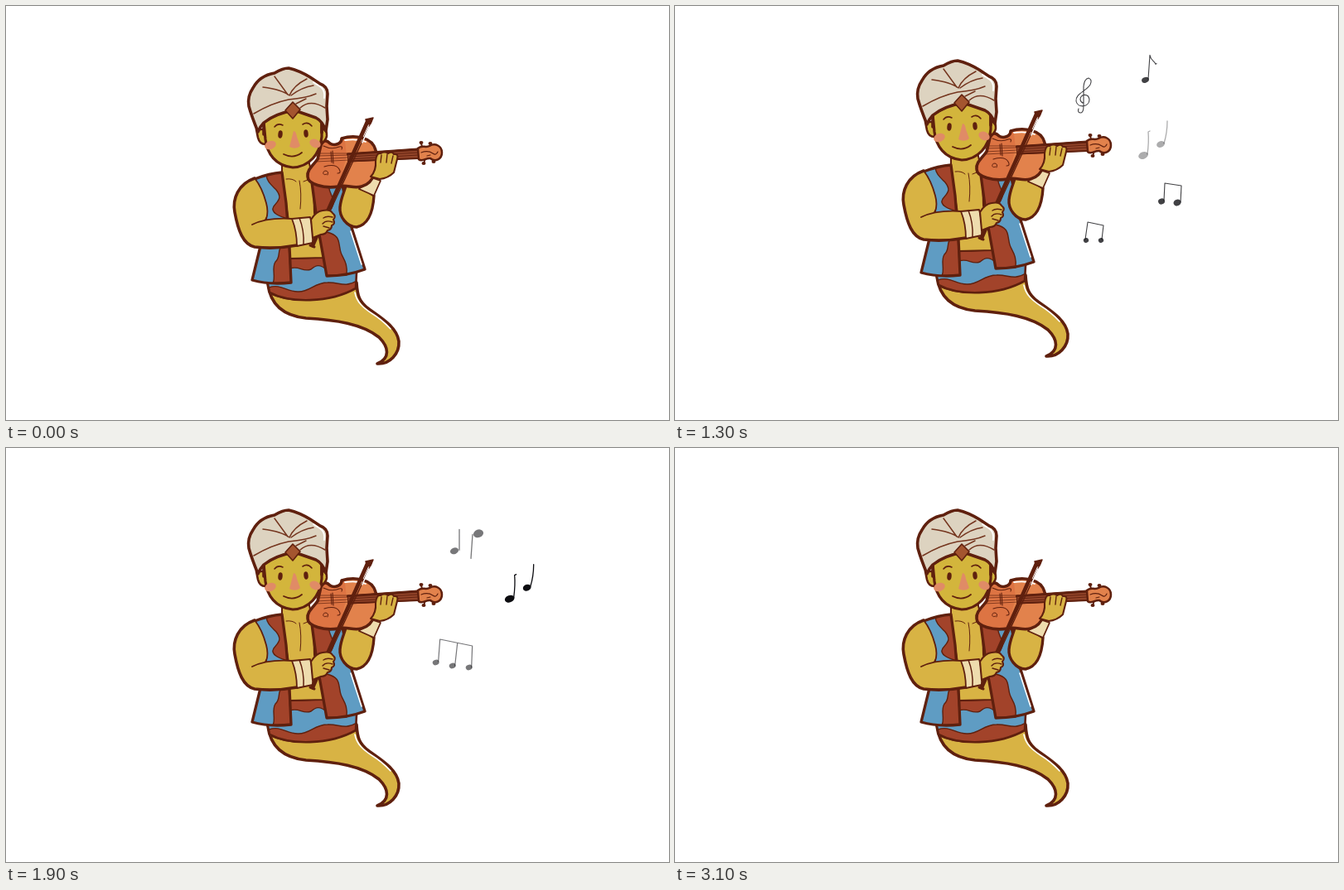
An HTML page with a canvas that plays this animation: 800 by 500 pixels, repeating every 3300 ms.

```html
<!DOCTYPE html>
<html lang="en">
<head>
<meta charset="utf-8">
<title>Genie playing the violin</title>
<style>
html, body { margin: 0; width: 100%; height: 100%; overflow: hidden; background: #fff; }
canvas { display: block; width: 800px; height: 500px; }
</style>
</head>
<body>
<canvas id="stage" width="800" height="500"></canvas>
<script>
const ctx = document.getElementById('stage').getContext('2d');
const LOOP = 3300;
const C = {
  ink: '#5f200e', skin: '#d8b344', face: '#d3b53c', blue: '#5f9cc3', red: '#a2432a',
  cloth: '#ddd3c0', fold: '#75361f', band: '#eedcae', wood: '#e2824c', woodDark: '#dd7443',
  neck: '#93452a', blush: '#e08b66', note: '#0c0c10'
};
ctx.lineCap = ctx.lineJoin = 'round';

function shape(d, fill, width = 0, ink = C.ink) {
  const path = new Path2D(d);
  if (fill) { ctx.fillStyle = fill; ctx.fill(path); }
  if (width) { ctx.strokeStyle = ink; ctx.lineWidth = width; ctx.stroke(path); }
}
const line = (d, width, ink) => shape(d, null, width, ink);

function oval(x, y, rx, ry, tilt, fill) {
  ctx.beginPath();
  ctx.ellipse(x, y, rx, ry, tilt, 0, Math.PI * 2);
  ctx.fillStyle = fill;
  ctx.fill();
}

function drawTail() {
  shape('M316 336 C319 360 334 374 362 377 C398 379 430 384 450 400 C462 412 464 425 448 432 ' +
    'C463 433 475 420 474 405 C472 388 452 376 438 366 C426 357 424 350 423 334 Z', C.skin, 3.6);
  line('M421 346 C423 358 432 365 441 371 Q454 379 464 390', 1.6, '#fff');
}

function drawSash() {
  const sash = 'M315 331 L318 346 C342 359 390 359 422 341 L423 322 L385 303 L342 305 Z';
  shape(sash, C.blue);
  shape('M342 305 L383 304 L388 319 C378 311 374 313 368 318 C358 322 354 313 343 317 Z', C.red, 1.4);
  shape('M317 340 C332 335 338 345 352 345 C366 346 372 334 388 334 C402 333 408 341 423 332 ' +
    'L422 341 C390 359 342 359 318 347 Z', C.red, 1.4);
  line(sash, 2.6);
}

function drawTorso() {
  shape('M333 186 L333 202 L337 235 L342 305 L384 304 L372 250 L371 212 L365 186 Z', C.skin, 2);
  line('M354 211 Q357 226 355 245 M338 209 Q346 208 350 212 M359 212 L364 210', 1);
}

function drawVest() {
  const right = 'M369 213 L405 211 L414 258 L433 318 Q412 326 387 326 L376 265 Z';
  shape(right, C.blue);
  shape('M369 212 L390 213 C386 224 400 232 393 244 C386 252 381 262 387 273 C403 277 401 284 ' +
    '403 293 C404 304 413 307 411 325 L387 326 L376 265 Z', C.red, 1.4);
  line(right, 3.3);
  line('M416 272 L429 312', 1.6, '#fff');

  const left = 'M300 209 Q318 202 333 201 L338 238 L342 290 L344 334 Q318 337 297 331 L308 286 L314 248 Z';
  shape(left, C.blue);
  shape('M314 204 Q324 202 333 201 L338 238 L341 257 C332 255 318 250 323 242 ' +
    'C328 235 334 232 326 222 C319 215 315 212 314 204 Z', C.red, 1.4);
  shape('M341 288 L344 334 L322 335 C326 326 320 317 325 309 C333 302 325 294 336 288 Z', C.red, 1.4);
  line(left, 3.3);
}

function drawStringArm() {
  shape('M410 217 L428 218 L444 229 C443 246 438 264 423 267 C411 267 402 254 403 243 C404 232 408 225 410 217 Z', C.skin, 3.4);
  shape('M440 207 L452 211 L444 229 L426 221 Z', C.band, 1.8);
}

function drawViolin() {
  const body = 'M380 168 C384 160 388 163 391 166 C396 169 405 167 405 160 C420 155 442 158 446 174 ' +
    'C451 192 445 214 429 218 C418 221 412 215 401 218 C384 221 364 215 364 206 C363 198 370 193 376 185 Z';
  shape(body, C.wood);
  ctx.save();
  ctx.clip(new Path2D(body));
  shape('M360 155 L408 155 L411 180 L401 222 L360 222 Z', C.woodDark);
  ctx.restore();
  line(body, 3.6);
  line('M409 162 Q424 160 434 164', 1.8, '#fff');
  line('M374 178 L414 178 M374 181 L414 180 M374 185 L414 183 M374 188 L414 186', .7);
  line('M394 175 L395 190 M392 176 L393 189', 1.1);
  line('M383 169 Q393 174 402 170 Q407 169 405 173 M384 194 Q398 190 402 197 Q405 202 400 202', 1.1);
  line('M387 203 C382 206 381 199 386 199 Q390 200 388 204', 1);
  shape('M412 178 L497 172 L498 184 L413 188 Z', C.neck, 1.2);
  line('M412 179 L497 173.5', 2.3);
  line('M413 187.5 L498 184', 1.8);
  line('M414 182 L497 177 M414 185 L497 180', .9);
  line('M503 174 L501 166 M513 173 L512 166 M506 184 L504 190 M516 183 L516 188', 2);
  for (const [x, y] of [[501, 165], [512, 166], [504, 190], [516, 188]]) oval(x, y, 2.5, 2, 0, C.ink);
  shape('M497 172 C502 167 506 172 511 169 C518 165 526 169 526 177 C526 185 518 189 512 184 ' +
    'C507 183 502 189 498 185 Z', C.wood, 2.5);
  line('M501 177 Q509 174 515 178 Q519 181 521 176 M508 181 L512 180', 1.2);
}

function drawStringHand() {
  shape('M446 187 Q447 177 452 178 Q457 175 461 178 Q466 175 468 179 Q474 178 472 185 ' +
    'Q470 193 468 201 Q461 208 451 209 L440 206 Q447 199 446 187 Z', C.skin, 2.1);
  line('M453 180 L452 189 M460 179 L459 189 M467 181 L465 190', 1.4);
}

function drawHead() {
  shape('M302 149 L304 159 Q306 167 313 167 L315 149 Z', C.face, 2.6);
  shape('M381 148 Q388 150 387 157 Q386 163 380 166 Z', C.face, 2.6);
  shape('M311 140 L313 161 C315 178 325 193 346 195 C366 194 379 179 381 158 L381 132 L346 120 Z', C.face, 3.2);
  line('M311 143 L311 155 M381 138 L381 153', 3.6);
  oval(319, 168, 7, 5, -.35, C.blush);
  oval(373, 166, 7, 5, .45, C.blush);
  shape('M347 151 Q350 151 351 158 L355 169 Q350 174 342 170 Z', C.blush);
  oval(331, 155, 2.7, 4.7, .1, C.ink);
  oval(362, 154, 2.7, 4.7, -.1, C.ink);
  line('M324 146 Q328 141 334 144 M358 143 Q364 139 369 145', 1.6);
  line('M335 179 Q347 185 357 177', 1.8);
}

function drawTurban() {
  const turban = 'M304 152 C300 142 296 132 293 121 Q291 109 298 99 Q306 84 324 81 Q334 75 341 75 ' +
    'Q354 78 367 86 L379 94 Q388 97 388 106 L387 121 L388 137 L386 151 Q382 139 374 135 L348 126 Q324 130 311 141 Q307 145 304 152 Z';
  shape(turban, C.cloth, 3.6);
  line('M371 92 L380 98 Q385 102 384 111', 1.8, '#fff');
  line('M299 130 Q321 117 341 113 Q363 111 374 106 M342 108 Q333 101 310 98 M340 107 Q332 96 324 85 ' +
    'M342 108 Q347 96 363 88 M344 108 Q357 98 371 96 M355 123 Q367 112 385 123 M350 118 L362 112', 1.5, C.fold);
  shape('M346 116 L355 125 L346 136 L337 126 Z', '#a4552f', 1.6);
}

function drawBowArm() {
  shape('M300 208 C280 215 273 233 276 249 C280 271 286 288 300 291 Q324 294 351 289 L346 257 ' +
    'Q328 256 312 258 Q318 250 314 238 Q309 219 300 208 Z', C.skin);
  line('M300 208 C280 215 273 233 276 249 C280 271 286 288 300 291 Q324 294 351 289', 3.6);
  line('M300 208 Q309 219 314 238 Q317 249 314 257 M297 264 Q315 255 346 257', 1.8);
  shape('M345 257 L367 255 Q371 270 370 286 L351 290 Q351 272 345 257 Z', C.band, 1.8);
  line('M354 256 Q360 271 359 288', 1.5);
}

function drawBow() {
  line('M441 139 L385 261', 1.4);
  line('M436 140 L370 289', 4.8);
  shape('M434 137 L443 135 L440 142 L436 143 Z', C.ink, 1.5);
  line('M438 146 L430 165', 1.5, '#fff');
  line('M367 289 L372 291', 3);
}

function drawBowHand() {
  shape('M368 258 Q374 248 382 247 Q391 245 394 250 Q399 254 395 258 Q398 263 393 265 ' +
    'Q393 270 388 271 Q386 276 380 276 L370 280 Z', C.skin, 2.1);
  line('M394 255 Q387 253 383 256 M394 261 Q386 258 382 263 M390 268 L383 266', 1.4);
}

const genieParts = [drawTail, drawSash, drawTorso, drawVest, drawStringArm, drawViolin,
  drawStringHand, drawHead, drawTurban, drawBowArm, drawBow, drawBowHand];

const head = (x, y, rx, ry) => oval(x, y, rx, ry, -.35, C.note);
const stem = (d, width = 1.1) => line(d, width, C.note);

function trebleClef() {
  stem('M477 133 Q475 138 480 138 Q483 137 483 130 L483 106 Q484 97 489 96 Q494 98 491 104 ' +
    'C486 112 473 115 474 124 C476 133 490 131 490 122 C489 114 479 115 479 122 Q480 126 483 126');
}
function flaggedNote() {
  head(557.5, 104, 4.5, 3.3);
  stem('M561 103 L563 74 C564 81 568 80 570 85 L571 84');
}
function wideBeam() {
  head(576, 225, 4, 3.5);
  head(595, 226.5, 4.6, 3.8);
  stem('M579 224 L580 203 L600 206 L599 226');
}
function smallBeam() {
  head(487, 272, 3.2, 2.8);
  head(505, 272, 3.2, 2.8);
  stem('M486 271 L489 250 L508 254 L506 271');
}
function twoQuarters() {
  head(599, 180.5, 6, 4.2);
  head(620, 167, 5, 3.8);
  stem('M604 179 Q606 164 605 152 L607 151 M624 166 Q628 153 628 139', 1.3);
}
function mirroredQuarters() {
  head(559, 103, 5.2, 3.8);
  head(588, 82, 6.2, 4.8);
  stem('M565 102 L565 77 M581 83 L579 112', 1.3);
}
function tripleBeam() {
  head(538, 275, 4, 3.2);
  head(558, 279, 4, 3.2);
  head(578, 281, 4, 3.2);
  stem('M541 274 L543 247 L582 255 L581 281 M561 279 L564 252', 1.2);
}

// Each key is [age in steps, dx, dy]; a note lives for seven steps.
const notes = [
  { draw: trebleClef, born: 0, keys: [[1, -9, 10], [3, 0, 0], [5, 10, -9], [7, 23, -26]] },
  { draw: flaggedNote, born: 0, keys: [[1, -10, 14], [7, 20, -29]] },
  { draw: wideBeam, born: 0, keys: [[1, -9, -11], [3, 0, 0], [5, 11, 11], [7, 22, 26]] },
  { draw: smallBeam, born: 0, keys: [[1, -9, -12], [3, 0, 0], [5, 9, 11], [7, 18, 28]] },
  { draw: twoQuarters, born: 4, keys: [[1, -34, 0], [3, 0, 0], [6, 26, 5], [7, 35, 7]] },
  { draw: mirroredQuarters, born: 6, keys: [[1, -27, 32], [4, 0, 0], [6, 13, -23], [7, 20, -34]] },
  { draw: tripleBeam, born: 6, keys: [[1, -29, -24], [4, 0, 0], [6, 18, 15], [7, 27, 22]] }
];

function offsetAt(keys, age) {
  const i = keys.findIndex((key, n) => n > 0 && age <= key[0]);
  const [a, b] = [keys[i - 1], keys[i]];
  const p = (age - a[0]) / (b[0] - a[0]);
  return [a[1] + (b[1] - a[1]) * p, a[2] + (b[2] - a[2]) * p];
}

function bob(step) {
  if (step <= 4) return -3 * step;
  return step <= 11 ? 3 * step - 24 : 42 - 3 * step;
}

function drawNote({ draw, born, keys }, step) {
  const age = step - born;
  if (age < 1 || age > 7) return;
  ctx.save();
  ctx.globalAlpha = 1 - Math.abs(age - 4) * .22;
  ctx.translate(...offsetAt(keys, age));
  draw();
  ctx.restore();
}

let shown = -1;
function frame(now) {
  const step = Math.max(0, Math.floor((now % LOOP - 300) / 200));
  if (step !== shown) {
    shown = step;
    ctx.fillStyle = '#fff';
    ctx.fillRect(0, 0, 800, 500);
    ctx.save();
    ctx.translate(0, bob(step));
    genieParts.forEach(draw => draw());
    ctx.restore();
    notes.forEach(note => drawNote(note, step));
  }
  requestAnimationFrame(frame);
}
frame(performance.now());
</script>
</body>
</html>
```
